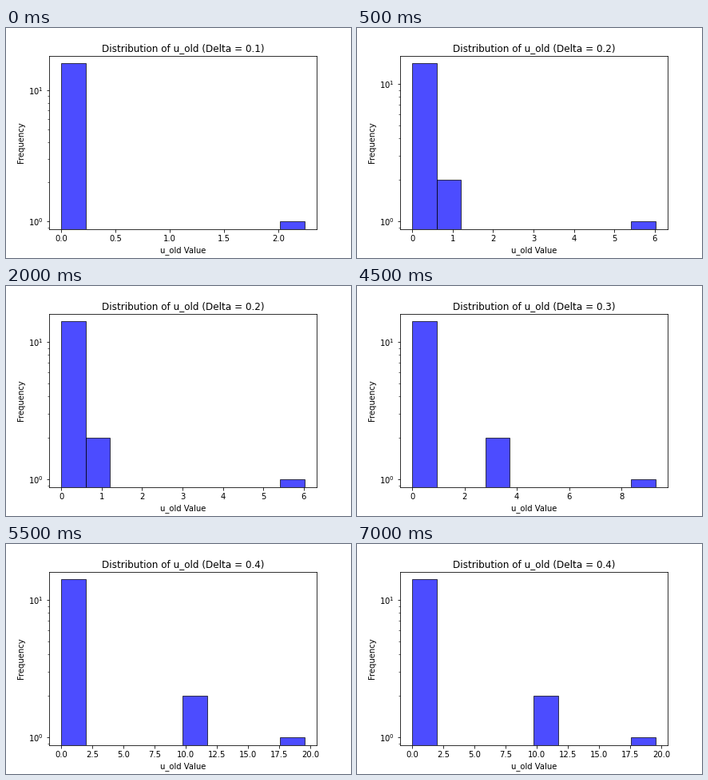
Animation, 432 px wide and 288 px high, one loop 8000 ms. Source, as a matplotlib script:

```python
import matplotlib.pyplot as plt
from matplotlib.animation import FuncAnimation

INTERVAL = 500
FRAMES = 16
HOLD = 5  # frames per histogram; the first one is entered on its last frame
PEAKS = [2.241, 6.013, 9.297, 19.52]  # largest u_old for each delta

plt.rcParams["font.family"] = "DejaVu Sans"
fig = plt.figure(figsize=(6, 4), dpi=72, facecolor="white")
ax = fig.add_axes([0.125, 0.125, 0.775, 0.755])


def sample(step):
    """Most values at rest, a pair drifting up by two bins a step, one at the peak."""
    peak = PEAKS[step]
    pair = max(0, 0.2 * step - 0.05) * peak
    return [0] * 14 + [pair] * 2 + [peak]


def draw(frame):
    step = (frame + HOLD - 1) // HOLD
    ax.clear()
    counts, _, bars = ax.hist(sample(step), bins=10, log=True,
                              color="blue", edgecolor="black", alpha=0.7)
    tallest = counts.max()
    ax.set_ylim(tallest ** -0.05, tallest ** 1.05)
    ax.set_title(f"Distribution of u_old (Delta = {0.1 * (step + 1):.1f})")
    ax.set_xlabel("u_old Value")
    ax.set_ylabel("Frequency")
    return bars.patches


anim = FuncAnimation(fig, draw, frames=FRAMES, init_func=lambda: draw(0),
                     interval=INTERVAL, repeat=True, repeat_delay=0)
plt.show()
```
